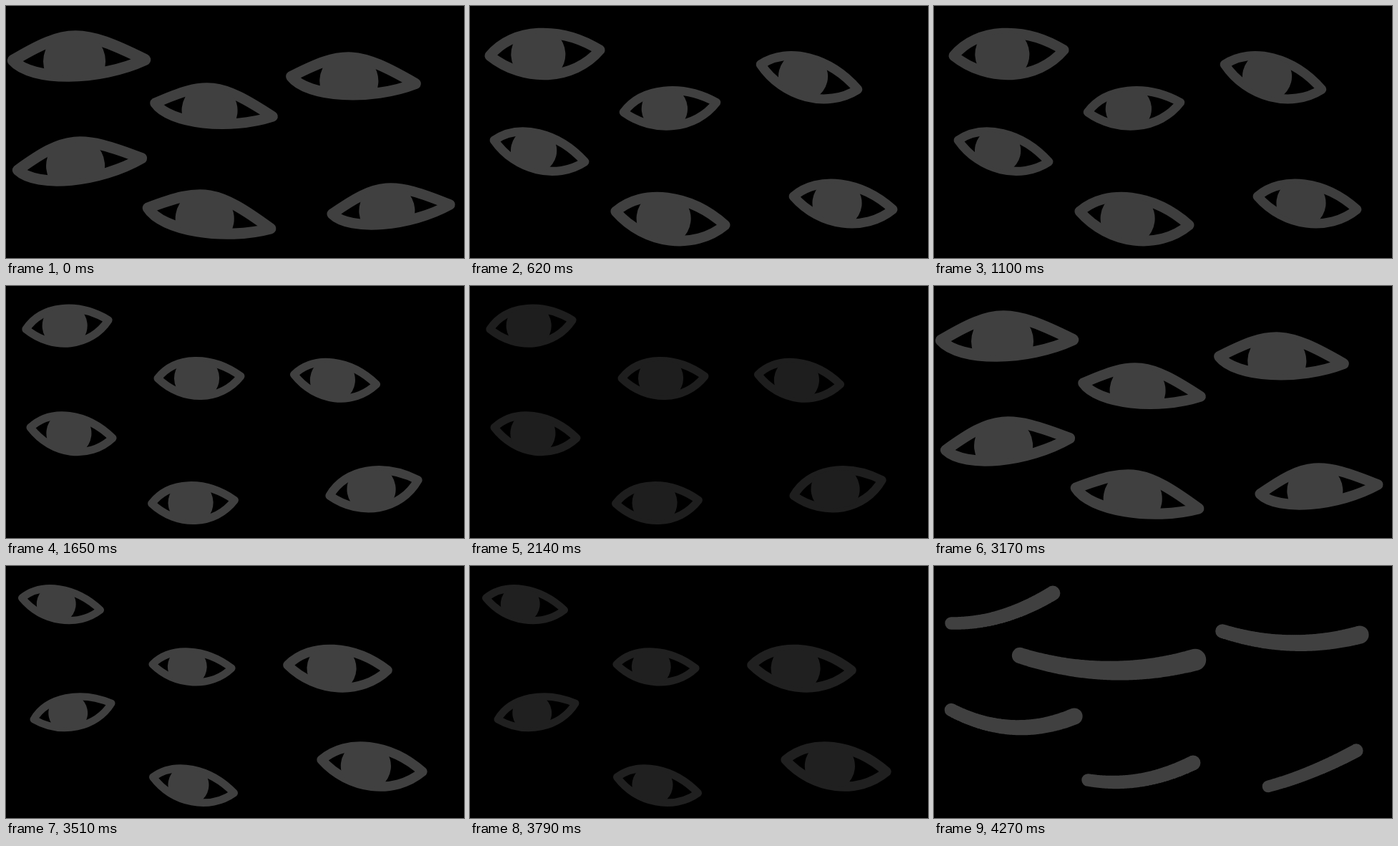
Write an HTML page with a canvas that moves like this. It is 640x352 px and loops after 4.34 s.

```html
<!DOCTYPE html>
<html lang="en">
<head>
<meta charset="utf-8">
<title>Eyes in the dark</title>
<style>
  html, body { margin: 0; width: 100%; height: 100%; overflow: hidden; background: #000; }
  canvas { display: block; width: 640px; height: 352px; }
</style>
</head>
<body>
<canvas id="stage" width="640" height="352"></canvas>
<script>
const ctx = document.getElementById('stage').getContext('2d');
const LOOP = 4340;
const STEP = 70;
const GRAY = 64;

// An almond one unit long: two bowed lids, an outline width and a round iris.
function makeEye({ length, line, up, down, upX = [0.22, 0.65], downX = [0.3, 0.75], iris, radius }) {
  const almond = new Path2D();
  almond.moveTo(0, 0);
  almond.bezierCurveTo(upX[0], -up, upX[1], -up, 1, 0);
  almond.bezierCurveTo(downX[1], down, downX[0], down, 0, 0);
  almond.closePath();
  const disc = new Path2D();
  disc.arc(iris, 0.01, radius, 0, Math.PI * 2);
  return { length, line, almond, disc };
}

const squint = makeEye({ length: 174, line: 0.087, up: 0.24, down: 0.16,
  upX: [0.41, 0.52], downX: [0.14, 0.65], iris: 0.465, radius: 0.236 });
const half = makeEye({ length: 140, line: 0.093, up: 0.242, down: 0.266, iris: 0.44, radius: 0.247 });
const open = makeEye({ length: 116, line: 0.095, up: 0.265, down: 0.3, iris: 0.47, radius: 0.272 });

// Places: centre x, centre y, tilt in degrees, size
const wide = { eye: squint, places: [
  [102, 75.5, -0.3, 1.06], [290.5, 145, 6.5, 0.95], [485.5, 103.5, 3.3],
  [103, 221, -5.5], [284, 296.5, 9.5], [538, 284, -4.5, 0.95]] };
const tilted = { eye: half, places: [
  [104.5, 65.5, -3, 1.1], [279.5, 141.5, -6, 0.93], [474, 99, 14.4],
  [97, 202.5, 13.4, 0.93], [280, 296.5, 7.1, 1.1], [521.5, 275, 7.5]] };
const round = { eye: open, places: [
  [85.5, 54, -6.3], [270, 127.5, -1.4], [460, 130.5, 6.8],
  [91.5, 205, 7.3], [261.5, 301.5, -2.3], [514, 282, -10, 1.08]] };
const small = { eye: { ...half, length: 111 }, places: [
  [77, 53, 8.7], [260, 140, 2.8], [463.5, 142, 3, 1.26],
  [93, 203, -11.7], [262, 306, 11.1, 1.04], [511.5, 279, 6.7, 1.28]] };

// Closed lids: start, end, sag
const closed = { lids: [
  [24, 80, 166, 38, 11], [120, 125, 365, 131, 18], [403, 91, 595, 96, 14],
  [24, 201, 196, 210, 20], [215, 299, 362, 275, 12], [467, 308, 590, 258, 4]] };

// Pose, fade-in start, full, fade-out start, end
const scenes = [
  [wide, 0, 0, 280, 490],
  [tilted, 490, 620, 1030, 1310],
  [round, 1380, 1650, 2070, 2200],
  [tilted, 2200, 2340, 2760, 2830],
  [wide, 2830, 2890, 3240, 3310],
  [small, 3510, 3510, 3720, 3860],
  [closed, 3860, 4000, LOOP, LOOP]
];

function drawEye(eye, [x, y, tilt, size = 1]) {
  const scale = eye.length * size;
  ctx.save();
  ctx.translate(x, y);
  ctx.rotate(tilt * Math.PI / 180);
  ctx.scale(scale, scale);
  ctx.translate(-0.5, 0);
  ctx.lineWidth = eye.line;
  ctx.lineJoin = 'round';
  ctx.stroke(eye.almond);
  ctx.clip(eye.almond);
  ctx.fill(eye.disc);
  ctx.restore();
}

// A brush stroke that thickens towards its end
function drawLid([x0, y0, x1, y1, sag]) {
  const length = Math.hypot(x1 - x0, y1 - y0);
  const thin = 5 + length * 0.025;
  const thick = 3 + length * 0.05;
  ctx.beginPath();
  for (let t = 0; t <= 1; t += 1 / 128) {
    const x = x0 + (x1 - x0) * t;
    const y = y0 + (y1 - y0) * t + 4 * sag * t * (1 - t);
    const r = thin + (thick - thin) * t;
    ctx.moveTo(x + r, y);
    ctx.arc(x, y, r, 0, Math.PI * 2);
  }
  ctx.fill();
}

function levelAt(time, [, start, full, out, end]) {
  const t = full + Math.floor((time - full) / STEP) * STEP;
  const rise = (t - start + STEP) / (full - start + STEP);
  const fall = t < out ? 1 : (end - t) / (end - out);
  return Math.max(0, Math.min(1, rise, fall));
}

function render(time) {
  ctx.fillStyle = '#000';
  ctx.fillRect(0, 0, 640, 352);
  const scene = scenes.find(s => time >= s[1] && time < s[4]);
  if (!scene) return;
  const pose = scene[0];
  const shade = Math.round(GRAY * levelAt(time, scene));
  ctx.fillStyle = ctx.strokeStyle = `rgb(${shade},${shade},${shade})`;
  if (pose.lids) pose.lids.forEach(drawLid);
  else pose.places.forEach(place => drawEye(pose.eye, place));
}

const begin = performance.now();
function tick() {
  render((performance.now() - begin) % LOOP);
  requestAnimationFrame(tick);
}
tick();
</script>
</body>
</html>
```
